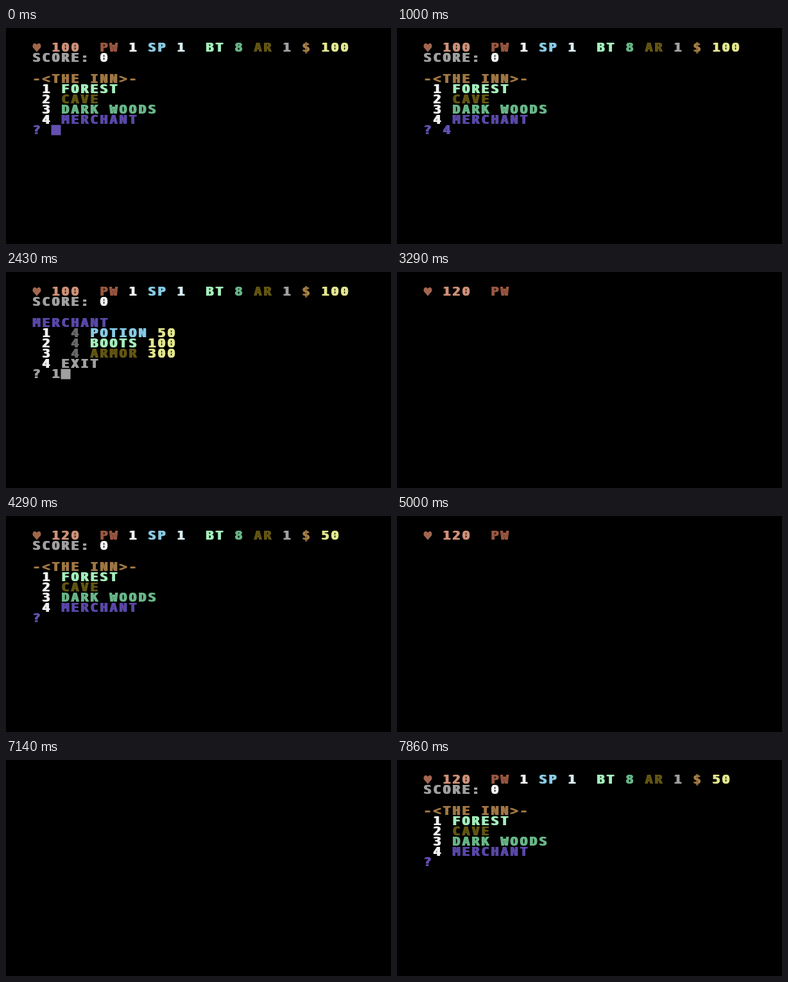
Write an HTML page with a canvas that moves like this. It is 600x338 px and loops after 8 s.

```html
<!DOCTYPE html>
<html lang="en">
<head>
<meta charset="utf-8">
<title>The Inn</title>
<style>
html, body { margin: 0; width: 100%; height: 100%; overflow: hidden; background: #000; }
canvas { display: block; width: 600px; height: 338px; filter: blur(.65px); }
</style>
</head>
<body>
<canvas id="screen" width="600" height="338"></canvas>
<script>
const ctx = document.getElementById('screen').getContext('2d');
const LOOP = 8000, FPS = 7;
const X0 = 40.5, Y0 = 23.3, CW = 15, CH = 16.05;
const SMEAR = 1.1; // horizontal spread of the beam

const C = {
  heart: '#a0664e', pink: '#cc9078', rust: '#985640', white: '#f0f0f0',
  cyan: '#88cae4', ice: '#d8ecf2', mint: '#a4eebc', green: '#68b688',
  olive: '#625512', silver: '#a0a0a0', gold: '#a67e46', lemon: '#e2e68e',
  orange: '#a07644', violet: '#5a48a8', purple: '#6450b0', dim: '#686868'
};

// Each part: row, column, text, colour
const header = (hp, cash) => [
  [0, 0, '♥', C.heart], [0, 2, hp, C.pink],
  [0, 7, 'PW', C.rust], [0, 10, '1', C.white],
  [0, 12, 'SP', C.cyan], [0, 15, '1', C.ice],
  [0, 18, 'BT', C.mint], [0, 21, '8', C.green],
  [0, 23, 'AR', C.olive], [0, 26, '1', C.silver],
  [0, 28, '$', C.gold], [0, 30, cash, C.lemon],
  [1, 0, 'SCORE:', C.silver], [1, 7, '0', C.white]
];

const keys = ['1', '2', '3', '4'].map((n, i) => [4 + i, 1, n, C.white]);

const inn = (hp, cash) => ({
  ink: C.purple,
  parts: [
    ...header(hp, cash), ...keys,
    [3, 0, '-<THE INN>-', C.orange],
    [4, 3, 'FOREST', C.mint],
    [5, 3, 'CAVE', C.olive],
    [6, 3, 'DARK WOODS', C.green],
    [7, 3, 'MERCHANT', C.violet],
    [8, 0, '?', C.purple]
  ]
});

const shop = (hp, cash, potions) => ({
  ink: C.silver,
  parts: [
    ...header(hp, cash), ...keys,
    [3, 0, 'MERCHANT', C.violet],
    [4, 4, potions, C.dim], [4, 6, 'POTION', C.cyan], [4, 13, '50', C.lemon],
    [5, 4, '4', C.dim], [5, 6, 'BOOTS', C.mint], [5, 12, '100', C.lemon],
    [6, 4, '4', C.dim], [6, 6, 'ARMOR', C.olive], [6, 12, '300', C.lemon],
    [7, 3, 'EXIT', C.silver],
    [8, 0, '?', C.silver]
  ]
});

const pages = [inn('100', '100'), shop('100', '100', '4'),
               inn('120', '50'), shop('120', '50', '3')];

// Printing position: row plus column / 40
const at = (row, col) => row + col / 40;
const ALL = 9;

// Each cue: step, page, print position, typed key, cursor shown
const cues = [
  [0, 0, ALL, '', 1], [1, 0, ALL, '', 0], [3, 0, ALL, '', 1],
  [5, 0, ALL, '4', 1], [6, 0, ALL, '4', 0],
  [8, 1, 0], [9, 1, at(0, 9)], [10, 1, 2], [11, 1, at(5, 2)],
  [12, 1, at(6, 5)], [13, 1, at(7, 7)],
  [14, 1, ALL, '', 1], [16, 1, ALL, '', 0],
  [17, 1, ALL, '1', 1], [18, 1, ALL, '1', 0],
  [21, 2, 0], [22, 2, at(0, 1)], [23, 2, at(0, 9)], [24, 2, 2],
  [25, 2, at(4, 9)], [26, 2, at(6, 8)], [27, 2, ALL],
  [28, 2, ALL, '', 1], [30, 2, ALL, '', 0], [32, 2, ALL, '', 1],
  [33, 2, ALL, '4', 1],
  [34, 3, 0], [35, 3, at(0, 9)], [36, 3, 2], [37, 3, at(5, 2)],
  [38, 3, at(7, 2)], [39, 3, ALL],
  [40, 3, ALL, '', 1], [42, 3, ALL, '', 0], [44, 3, ALL, '', 1],
  [46, 3, ALL, '4', 1], [47, 3, ALL, '4', 0],
  [50, 2, 0], [51, 2, at(0, 9)], [52, 2, 2],
  [53, 2, at(4, 9)], [54, 2, at(6, 8)], [55, 2, ALL]
];

function heart(x, y) {
  ctx.beginPath();
  ctx.moveTo(x + 7.5, y + 14.2);
  ctx.lineTo(x + 1.2, y + 7);
  ctx.bezierCurveTo(x, y, x + 6, y - 1, x + 7.5, y + 3);
  ctx.bezierCurveTo(x + 9, y - 1, x + 15, y, x + 13.8, y + 7);
  ctx.closePath();
  ctx.fill();
}

function put(row, col, ch, color) {
  const x = X0 + col * CW, y = Y0 + row * CH;
  ctx.fillStyle = color;
  if (ch === '♥') return heart(x, y);
  for (const dx of [-SMEAR, SMEAR])
    ctx.fillText(ch, x + 7.1 + dx, y + 14.1);
}

function draw(step) {
  const [, id, limit, typed = '', cursor = 0] = cues.findLast(c => c[0] <= step);
  const page = pages[id];
  ctx.fillStyle = '#000';
  ctx.fillRect(0, 0, 600, 338);
  ctx.font = 'bold 19.5px "DejaVu Sans Mono", monospace';
  ctx.textAlign = 'center';
  for (const [row, col, text, color] of page.parts)
    [...text].forEach((ch, i) => {
      if (at(row, col + i) < limit) put(row, col + i, ch, color);
    });
  if (typed) put(8, 2, typed, page.ink);
  if (cursor) {
    ctx.fillStyle = page.ink;
    ctx.fillRect(X0 + (2 + typed.length) * CW, Y0 + 8 * CH, CW, CH);
  }
}

function tick(now) {
  const t = now % LOOP;
  draw(Math.floor((t + 6) * FPS / 1000) % (LOOP * FPS / 1000));
  requestAnimationFrame(tick);
}
draw(0);
requestAnimationFrame(tick);
</script>
</body>
</html>
```
